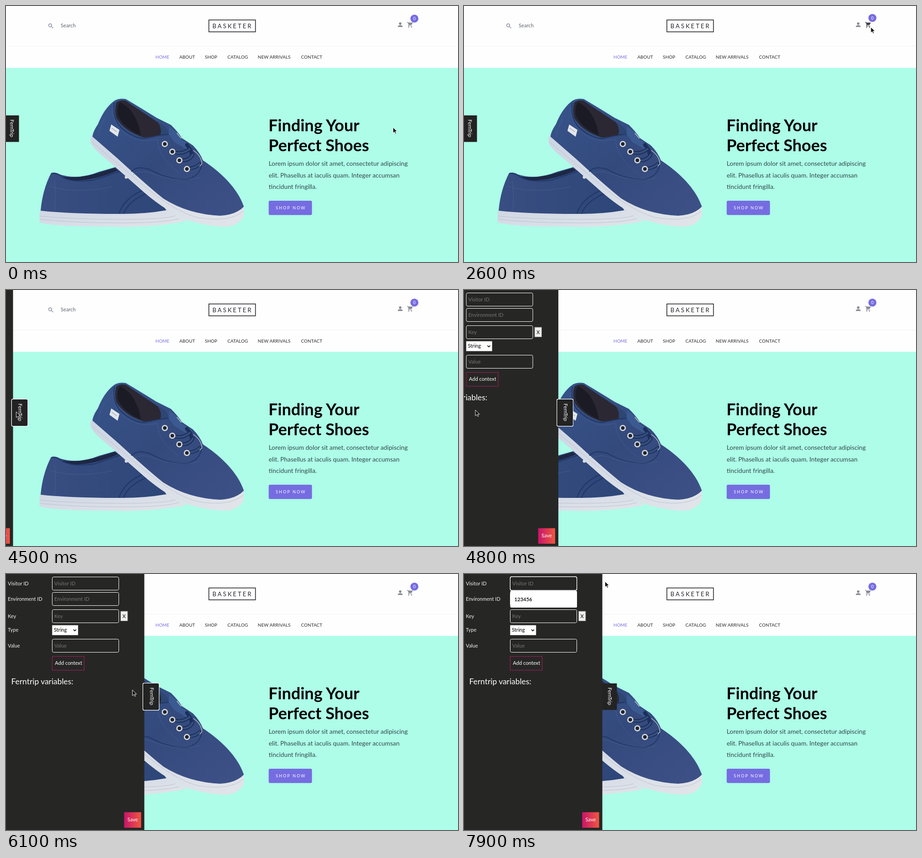
Write an HTML page that moves like this. It is 992x564 px and loops after 8000 ms.

```html
<!DOCTYPE html>
<html lang="en">
<head>
<meta charset="utf-8">
<title>Shoe store with settings drawer</title>
<style>
html, body { margin: 0; width: 100%; height: 100%; overflow: hidden; background: #fff; }
svg { display: block; width: 100vw; height: 100vh; }
text { font: 400 11.2px Lato, "Open Sans", sans-serif; white-space: pre; }
.brand { font-size: 13.3px; letter-spacing: 2.9px; fill: #25262a; }
.nav text { font-size: 9.8px; letter-spacing: .15px; fill: #25262a; }
.nav text:first-child { fill: #766ce1; }
.title { font-size: 36px; font-weight: 700; }
.copy { font-size: 13.8px; fill: #33464a; }
.shop { font-size: 9px; letter-spacing: 2.1px; fill: #fff; }
.label { font-size: 11px; fill: #f2f2f2; }
.hint { fill: #757575; }
.white { fill: #fff; }
.field { fill: #262725; stroke: #fff; }
.line { fill: none; stroke: #1f3766; stroke-width: 2; }
.stitch { fill: none; stroke: #5870a0; stroke-width: .8; stroke-dasharray: 2 1.5; }
.tread { fill: none; stroke: #b4bccb; stroke-width: .8; }
</style>
</head>
<body>
<svg viewBox="0 0 992 564" preserveAspectRatio="none">
  <defs>
    <linearGradient id="canvas" x1="0" y1="0" x2="1" y2="1">
      <stop offset="0" stop-color="#36548a"/><stop offset=".5" stop-color="#344a7d"/><stop offset="1" stop-color="#3e5187"/>
    </linearGradient>
    <linearGradient id="rear" x1="0" y1="0" x2="1" y2="0">
      <stop offset="0" stop-color="#394e82"/><stop offset="1" stop-color="#2d4678"/>
    </linearGradient>
    <linearGradient id="rubber" x1="0" y1="0" x2="1" y2="1">
      <stop offset="0" stop-color="#cdd5e3"/><stop offset="1" stop-color="#e2e5ea"/>
    </linearGradient>
    <linearGradient id="save">
      <stop offset="0" stop-color="#c8156b"/><stop offset="1" stop-color="#f0573f"/>
    </linearGradient>
  </defs>

  <!-- header -->
  <rect width="992" height="564" fill="#fefefe"/>
  <path d="M0 88.3H992" stroke="#f0f0f1"/>
  <g fill="none" stroke="#8c92a0" stroke-width="1.5">
    <circle cx="97" cy="42.6" r="3.3"/><path d="M99.5 45l4 4"/>
  </g>
  <text x="120" y="47" fill="#5c636a">Search</text>
  <rect x="445.3" y="30.7" width="102.2" height="26.2" fill="none" stroke="#25262a" stroke-width="1.6"/>
  <text class="brand" x="453" y="48.7">BASKETER</text>
  <g fill="#868a93">
    <circle cx="865.2" cy="38.8" r="2.7"/>
    <path d="M860 46.3v-1.4c0-1.8 3.4-2.7 5.2-2.7s5.2.9 5.2 2.7v1.4z"/>
  </g>
  <g id="cart" fill="currentColor" transform="translate(879.6 34) scale(.61)">
    <path d="M1 2v2h2l3.6 7.6-1.4 2.4c-.7 1.4.3 3 1.8 3h12v-2H7.4l1.1-2h7.5c.7 0 1.4-.4 1.7-1l3.6-6.5c.4-.7-.1-1.5-.9-1.5H5.2l-.9-2z"/>
    <circle cx="7" cy="20" r="2"/><circle cx="17" cy="20" r="2"/>
  </g>
  <g id="badge">
    <circle cx="896.3" cy="27.8" r="8.8" fill="#766ce1"/>
    <text class="white" x="896.3" y="31" text-anchor="middle" style="font-size:9.5px">0</text>
  </g>
  <g class="nav" id="nav"></g>

  <!-- hero -->
  <rect y="136.3" width="992" height="428" fill="#adfde8"/>

  <g>
    <path d="M74 452Q73 470 74 477Q110 486 200 486L270 487Q340 485 396 474L340 440Z" fill="url(#rubber)"/>
    <path class="tread" d="M75 463Q150 470 250 470T372 462M75 470Q150 478 250 478T380 468"/>
    <path d="M99 368Q108 365 118 371Q158 384 205 365L240 355L345 440L352 450Q300 459 245 458Q140 458 76 451Q80 405 99 368Z" fill="url(#rear)"/>
    <path d="M124 376Q160 381 205 367L238 357L246 362Q190 386 150 384Q134 383 124 376Z" fill="#1d2744"/>
    <path class="line" d="M100 369Q112 367 125 378Q150 390 195 383L250 364M248 457Q260 422 305 404M258 457Q270 428 313 411"/>
    <path class="stitch" d="M106 385Q110 415 107 450M96 397Q150 415 235 398"/>
    <circle cx="264" cy="377" r="3.5" fill="#d8dce2"/>
  </g>

  <g>
    <path d="M193 279Q182 290 187 304Q193 316 222 339L290 399Q340 445 392 470Q450 488 490 486Q515 480 522 462V443L450 455L300 372Z" fill="url(#rubber)"/>
    <path class="tread" d="M189 300Q230 335 300 394T420 466Q490 478 521 452"/>
    <path d="M235 211Q245 202 263 205Q295 224 330 246L362 262Q378 278 386 291L410 307Q426 323 432 340C464 361 507 397 522 442Q505 460 470 462Q400 459 345 424Q310 396 245 336L190 288Q190 278 202 260Q215 227 235 211Z" fill="url(#canvas)"/>
    <path d="M242 213Q250 206 263 209Q300 234 333 256Q353 267 357 280Q330 287 304 290Q262 278 242 247Q237 230 242 213Z" fill="#2b2833"/>
    <path d="M250 212Q286 228 296 285Q258 270 245 240Q243 222 250 212Z" fill="#1b1b25"/>
    <path d="M333 256Q353 267 357 280L339 284Q343 270 333 256Z" fill="#2d4774"/>
    <path class="line" d="M238 213Q232 247 253 268Q280 292 305 292Q340 283 358 283Q371 287 407 316M275 365Q286 351 315 360Q355 383 397 382Q427 375 430 346"/>
    <path class="stitch" d="M236 225Q231 247 252 274Q280 297 308 297L333 294Q333 332 381 368M280 371Q297 361 318 368Q370 389 425 378M216 249Q205 270 202 290"/>
    <path d="M358 265L374 278L384 293L408 309L400 318L370 300L357 283Z" fill="#3b5a91"/>
    <path d="M375 280l10 12" stroke="#c5c9cf" stroke-width="1.5"/>
    <g fill="none" stroke="#1d3059" stroke-width="8" stroke-linecap="round">
      <path d="M365 321Q385 329 403 315M381 340Q402 342 410 327M397 358Q414 359 425 348M397 306Q407 317 408 329"/>
      <path d="M365 321Q385 329 403 315M381 340Q402 342 410 327M397 358Q414 359 425 348" stroke="#35507f" stroke-width="4"/>
    </g>
    <path d="M411 318Q429 330 430 348l-5 5" fill="none" stroke="#b9c1cc" stroke-width="1.5"/>
    <g id="eyelets" fill="#1d2437" stroke="#dddcd5" stroke-width="2.8"></g>
    <path d="M231 261l18 12-4 15-18-13z" fill="#e3e7ec"/>
    <path d="M232 269l11 8" stroke="#858e9e" stroke-width="1.5" stroke-dasharray="2 1"/>
  </g>

  <text class="title" x="576" y="276">Finding Your</text>
  <text class="title" x="576" y="320">Perfect Shoes</text>
  <g id="copy"></g>
  <rect x="576.5" y="429" width="95" height="31.5" rx="3" fill="#766ce1"/>
  <text class="shop" x="592" y="448">SHOP NOW</text>

  <!-- settings drawer -->
  <g id="drawer">
    <rect x="301" y="241" width="34.5" height="58.5" fill="#222322"/>
    <rect x="-3" width="306.6" height="564" fill="#262725"/>
    <g id="ring">
      <rect x="300.5" y="240.5" width="35.5" height="59.5" rx="2.5" fill="#222322" stroke="#fff" stroke-width="1.4"/>
      <rect x="301.8" y="241.8" width="32.9" height="56.9" rx="1.5" fill="none" stroke="#101010"/>
    </g>
    <text class="white" transform="translate(315.6 250) rotate(90)">FernTrip</text>
    <g id="form"></g>
    <rect x="251.5" y="82" width="15.5" height="21.5" fill="#efefef" stroke="#777"/>
    <text x="259.2" y="96.7" text-anchor="middle">X</text>
    <rect x="101.5" y="113" width="56.5" height="21.5" fill="#fff" stroke="#ccc" stroke-width=".6"/>
    <text x="105" y="127.3">String</text>
    <path d="M148 122.3l3 3 3-3" fill="none" stroke="#111" stroke-width="1.7"/>
    <rect x="101.5" y="181.5" width="70" height="30.5" fill="none" stroke="#b5175f"/>
    <text class="white" x="107.2" y="200.3">Add context</text>
    <text class="white" x="11.5" y="242.5" style="font-size:17.4px">Ferntrip variables:</text>
    <rect x="259.3" y="524.8" width="37.2" height="34.2" fill="url(#save)"/>
    <text class="white" x="278" y="545.3" text-anchor="middle">Save</text>
    <g id="focus">
      <rect x="101.5" y="6" width="146" height="30" rx="3" fill="none" stroke="#fff" stroke-width="1.6"/>
      <rect x="103" y="7.3" width="143" height="27.4" rx="2" fill="none" stroke="#0c0c0c"/>
      <rect x="101.5" y="37" width="146.5" height="37" rx="2.5" fill="#fff"/>
      <text x="110.5" y="59.8" style="font-weight:700" fill="#222">123456</text>
    </g>
    <path id="caret" d="M106.5 11.5V31" stroke="#fff"/>
  </g>

  <!-- pointers -->
  <g id="pointer">
    <path id="arrow" d="M.4.4V13l3-2.7 2.1 4.4 2-1-2-4.2h4z" fill="#111" stroke="#fff" stroke-width=".9"/>
    <path id="beam" d="M-2.5-6.5Q0-6.5 0-5Q0-6.5 2.5-6.5M0-5V5M-2.5 6.5Q0 6.5 0 5Q0 6.5 2.5 6.5" fill="none" stroke="#fff" stroke-width="1.2"/>
  </g>
</svg>
<script>
const LOOP = 8000, TICK = 100;
const el = id => document.getElementById(id);
const label = (x, y, s, cls = "") => `<text class="${cls}" x="${x}" y="${y}">${s}</text>`;

el("nav").innerHTML = [
  [328, "HOME"], [380.5, "ABOUT"], [436.5, "SHOP"],
  [486, "CATALOG"], [552.5, "NEW ARRIVALS"], [647.5, "CONTACT"]
].map(([x, s]) => label(x, 116.4, s)).join("");

el("copy").innerHTML = [
  "Lorem ipsum dolor sit amet, consectetur adipiscing",
  "elit. Phasellus at iaculis quam. Integer accumsan",
  "tincidunt fringilla."
].map((s, i) => label(576.5, 352 + i * 25.5, s, "copy")).join("");

el("eyelets").innerHTML = [[348.5, 304], [365, 321], [380.5, 340], [397, 359]]
  .map(([x, y]) => `<circle cx="${x}" cy="${y}" r="5.4"/>`).join("");

el("form").innerHTML = [
  ["Visitor ID", 6.5], ["Environment ID", 40.5], ["Key", 78.5], ["Value", 143.5]
].map(([s, y]) => label(4, y + 18, s, "label") +
  `<rect class="field" x="101.5" y="${y}" width="146" height="29" rx="3"/>` +
  label(106, y + 18, s, "hint")).join("") + label(4, 127.3, "Type", "label");

// pointer stops: time, x, y
const stops = [
  [0, 849, 267], [100, 848, 262], [400, 834, 202], [500, 834, 202],
  [700, 829, 120], [900, 832, 50], [1000, 832, 50], [1200, 850, 44],
  [1400, 882, 40], [1600, 903, 40], [1800, 880, 42], [1900, 880, 42],
  [2400, 885, 46], [2700, 896, 46], [3100, 909, 40], [3200, 909, 40],
  [3300, 845, 75], [3500, 604, 219], [3700, 320, 275], [3900, 110, 274],
  [4100, 22, 268], [4500, 22, 268], [4800, 24.5, 264], [5200, 39, 276],
  [5500, 120, 290], [5800, 245, 284], [6000, 281, 280], [6100, 277, 255],
  [6400, 225, 110], [6600, 203, 20], [6800, 206.5, 28], [7500, 206.5, 28],
  [7600, 262, 21], [7700, 309, 16], [LOOP, 309, 16]
];
const move = (x, y) => `translate(${x}px, ${y}px)`;
const tracks = [
  el("pointer").animate(
    stops.map(([t, x, y]) => ({ offset: t / LOOP, transform: move(x, y) })),
    { duration: LOOP, fill: "both" }),
  el("drawer").animate(
    { transform: [move(-307, 0), move(0, 0)] },
    { delay: 4430, duration: 920, easing: "ease", fill: "both" })
];
tracks.forEach(track => track.pause());

const windows = {
  ring: [4300, 7200], focus: [7200, LOOP], caret: [7200, 7900], beam: [6600, 7600]
};
const within = (t, [from, to]) => t >= from && t < to;
const show = (id, on) => { el(id).style.visibility = on ? "visible" : "hidden"; };

function draw(time) {
  const t = Math.floor((time % LOOP) / TICK) * TICK;
  tracks.forEach(track => { track.currentTime = t; });
  for (const id in windows) show(id, within(t, windows[id]));
  show("arrow", !within(t, windows.beam));
  const hover = within(t, [1400, 2700]);
  el("cart").style.color = hover ? "#3f424b" : "#868a93";
  el("badge").style.transform = move(0, hover ? -1.5 : 0);
}

const start = performance.now();
(function frame() {
  draw(performance.now() - start);
  requestAnimationFrame(frame);
})();
</script>
</body>
</html>
```
